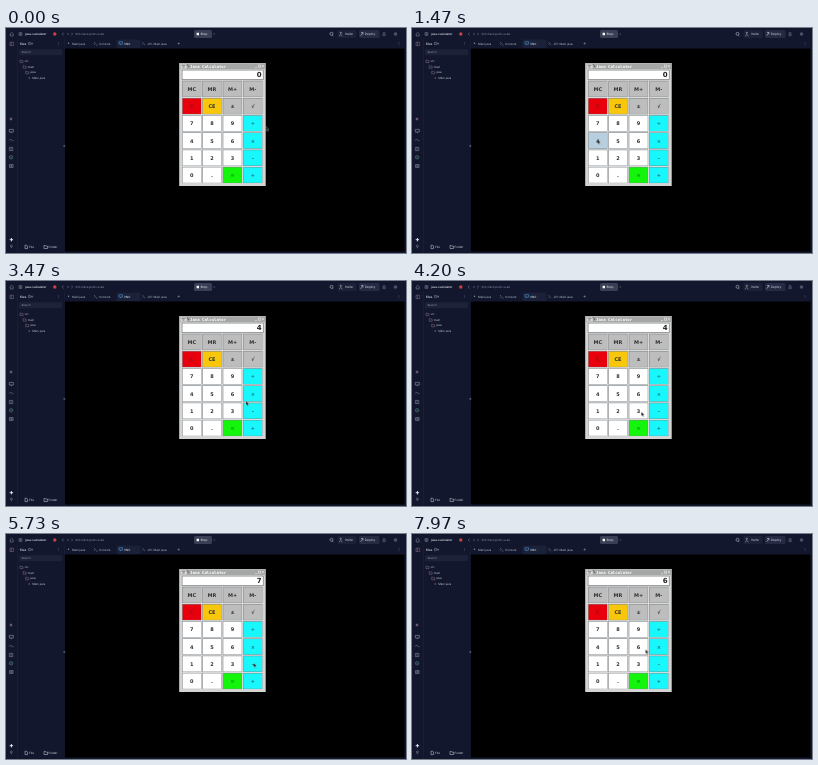
Animation of 400x225 px, one loop 8000 ms. Source, as an HTML page:

```html
<!DOCTYPE html>
<html lang="en">
<head>
<meta charset="utf-8">
<title>Java Calculator</title>
<style>
  html, body { margin: 0; width: 100%; height: 100%; overflow: hidden; background: #000; }
  svg { display: block; width: 100vw; height: 100vh; }
  text { font: 3px Inter, sans-serif; text-rendering: geometricPrecision; }
  .key, .value { font-family: "DejaVu Sans", sans-serif; font-weight: 700; text-anchor: middle; }
  .key { font-size: 5px; }
  .value { font-size: 7px; text-anchor: end; }
  .caption { font: 700 4px "DejaVu Sans Mono", monospace; }
</style>
</head>
<body>
<svg id="stage" viewBox="0 0 400 225" preserveAspectRatio="none"></svg>
<script>
const LOOP = 8000;
const stage = document.getElementById("stage");
const NAVY = "#12172d", LINE = "#1f2740", PALE = "#d5dbe5", MUTED = "#8b95a8", FOLDER = "#8d7085";

function add(tag, attrs, content) {
  const node = document.createElementNS("http://www.w3.org/2000/svg", tag);
  for (const name in attrs) node.setAttribute(name, attrs[name]);
  if (content) node.textContent = content;
  return stage.appendChild(node);
}
const rect = (x, y, width, height, fill, rx = 0) => add("rect", { x, y, width, height, fill, rx });
const dot = (cx, cy, r, fill) => add("circle", { cx, cy, r, fill });
const stroke = (d, color = MUTED, width = 0.5) =>
  add("path", { d, fill: "none", stroke: color, "stroke-width": width });
const label = (x, y, content, fill = PALE, size = 3, weight = 400) =>
  add("text", { x, y, fill, style: `font-size:${size}px;font-weight:${weight}` }, content);
const loop = (node, frames) => node.animate(frames, { duration: LOOP, iterations: Infinity });
const menuDots = (x, y) => [-1, 0, 1].forEach(step => dot(x, y + step, 0.3, MUTED));

function drawHeader() {
  stroke("M3.7 6.2l2-1.9 2 1.9M4.3 6v2h2.8v-2");
  stroke("M13 4.7h2.8v2.6H13zM14.4 4.7v2.6");
  label(19.2, 7.1, "java-calculator", PALE, 2.95, 600);
  dot(48.8, 6, 1.7, "#c8403f");
  stroke("M57.6 4.6l-1.4 1.4 1.4 1.4M61 6h2M65.4 4.8l1.2 1.2-1.2 1.2");
  label(69.5, 7.1, "5/5 checkpoints used", MUTED, 2.8);
  rect(188, 2, 18, 8, "#3a3f55", 1.5);
  rect(190.6, 4.8, 2.4, 2.4, "#f5f9fc", 0.3);
  label(194.6, 7.1, "Stop", "#f5f9fc", 3.1);
  stroke("M207.3 5.5l.9.9.9-.9");
  stroke("M326.3 7.2l1 1M327 5.8a1.5 1.5 0 1 1-3 0 1.5 1.5 0 1 1 3 0", PALE);
  rect(331.5, 2, 19, 8, "#1c2138", 1.5);
  stroke("M333.2 8q1.6-3 3.2 0M335.4 4.8a.6.6 0 1 1-1.2 0 .6.6 0 1 1 1.2 0", PALE);
  label(338.8, 7.1, "Invite", PALE, 3.15);
  rect(353, 2, 20.5, 8, "#262b43", 1.5);
  stroke("M354.6 7.8l2.3-3.2M355 4.5h2v2", PALE);
  label(358.8, 7.1, "Deploy", PALE, 3.15);
  stroke("M376.7 7.2h2.8l-.5-.8v-1q0-1-.9-1t-.9 1v1zM377.8 8h.6");
  dot(389.5, 6, 1.8, "#4c5268");
}

function drawTabs() {
  rect(110.5, 11.5, 24, 8.5, "#1b2139", 1.2);
  const tabs = [[66, "Main.java"], [93, "Console"], [118, "VNC"], [141.5, "JPI: Main.java"]];
  tabs.forEach(([x, name]) => label(x, 16.5, name, name === "VNC" ? "#f5f9fc" : "#b4bdcb", 2.95));
  dot(62.5, 15.3, 0.7, MUTED);
  stroke("M88 14l1.4 1.4L88 16.8M90 17h1.5");
  stroke("M113 13.7h3.5v2.4H113zM114.7 16v1.1", "#55a6ed");
  stroke("M136.5 14.2l1.2 1.2-1.2 1.2M138.2 16.7h1");
  stroke("M171.5 15.5h2.4M172.7 14.3v2.4");
  menuDots(393, 15.5);
}

function drawSidebar() {
  stroke("M11.5 11v214M58.3 11v214", LINE, 0.5);
  stroke("M4 14.2h3.6v3.4H4zM5.4 14.2v3.4", FOLDER);
  label(13.7, 17, "Files", PALE, 3, 600);
  stroke("M22.5 14.4h1.8v2.2h-1.8zM26 14.4v2.4M24.9 15.6h2.2");
  menuDots(52.5, 15.5);
  rect(13, 21.3, 43, 5.9, "#1d2239", 1);
  label(15.5, 25.2, "Search", MUTED, 2.8);

  [[14, 33, "src"], [17.2, 38.6, "main"], [19.7, 44.2, "java"]].forEach(([x, y, name]) => {
    stroke(`M${x} ${y - 1}h1.1l.5.6h1.4v2h-3z`, FOLDER);
    label(x + 4.5, y + 1, name, "#b4bdcb", 2.9);
  });
  dot(23.2, 50, 0.7, FOLDER);
  label(26.2, 51, "Main.java", "#b4bdcb", 2.9);

  stroke("M5 89.4v3.2M3.4 91h3.2M3.9 89.9l2.2 2.2M3.9 92.1l2.2-2.2", FOLDER);
  stroke("M3.3 101.4h4v2.6h-4zM5.3 104v1.2", "#a4afc2");
  stroke("M3.2 112.6q1-2.4 2.4-.6t2 .3");
  stroke("M3.4 119.4h3.4v3.2H3.4zM5.1 119.4v3.2");
  stroke("M6.8 129.3a1.7 1.7 0 1 1-3.4 0 1.7 1.7 0 1 1 3.4 0M4.4 129.3h1.4", "#62a38d");
  stroke("M3.5 136.5h3.6v3H3.5zM3.5 138h3.6M5.3 136.5v3");
  stroke("M5.4 210v3.4M3.7 211.7h3.4", "#f0f3f7", 0.9);
  stroke("M6.4 218a1 1 0 1 1-2 0 1 1 0 1 1 2 0M5.4 219v1.2");

  stroke("M19 217.2h1.7l.8.8v2.6H19z", PALE);
  label(23, 220, "File", PALE, 2.95);
  stroke("M38 217.5h1.3l.5.6h1.8v2.4H38z", PALE);
  label(42.6, 220, "Folder", PALE, 2.95);
  dot(58.2, 118, 1.3, "#27324a");
  stroke("M58.5 117.3l-.7.7.7.7", PALE, 0.35);
}

const COLS = [185.8, 206, 226.5, 246.9];
const ROWS = [61, 78.2, 95.4, 112.7, 129.9, 147.1];
const LABELS = ["MC MR M+ M-", "C CE ± √", "7 8 9 ÷", "4 5 6 ×", "1 2 3 -", "0 . = +"];

function keyColor(row, col, name) {
  if (name === "C") return "#e8000c";
  if (name === "CE") return "#f8c70c";
  if (name === "=") return "#14f50c";
  if (row < 2) return "#bdbdbd";
  return col === 3 ? "#18f7fb" : "#fff";
}

// Keys with a thin dark edge and a light lower-right lip; returns each face by its label.
function drawKeys() {
  const faces = {};
  LABELS.forEach((line, row) => line.split(" ").forEach((name, col) => {
    const x = COLS[col], y = ROWS[row];
    rect(x - 9.3, y - 7.8, 19.3, 16.3, "#f4f4f4");
    rect(x - 9.7, y - 8.2, 19.3, 16.3, "#7d8388");
    faces[name] = rect(x - 9.2, y - 7.7, 18.4, 15.4, keyColor(row, col, name));
    const ink = name === "C" ? "#9c1015" : name === "=" ? "#157a18" : col === 3 && row > 1 ? "#156e80" : "#303030";
    add("text", { class: "key", x, y: y + 1.8, fill: ink }, name);
  }));
  return faces;
}

function drawWindow() {
  rect(173.2, 35, 86.5, 123, "#d4d4d4");
  rect(173.5, 35.3, 85.9, 5.8, "#a5a7a6");
  rect(174.5, 36, 6.2, 4.5, "#d9d9d9");
  stroke("M175.5 37.2h4M176.4 39h2.2M180.7 36l2.3 3", "#333", 0.6);
  add("text", { class: "caption", x: 184, y: 39.5, fill: "#fff" }, "Java Calculator");
  stroke("M249 39.6h2M252.5 37h2v2.4h-2zM256 37l2 2.4m0-2.4l-2 2.4", "#f6f6f6", 0.5);
  rect(175.8, 41.8, 81.7, 10, "#6e7478");
  rect(176.4, 42.4, 80.5, 8.8, "#fff");
  return drawKeys();
}

// Key clicks: press time, key, value shown on release.
const CLICKS = [
  [1430, "4", "4"], [3740, "+", "4"], [4370, "3", "3"], [4900, "=", "7"],
  [5770, "-", "7"], [6560, "1", "1"], [7210, "=", "6"]
];
const HOLD = 110;

function playClicks(faces) {
  for (const name of new Set(CLICKS.map(click => click[1]))) {
    const face = faces[name], base = face.getAttribute("fill");
    const frames = [{ offset: 0, fill: base, easing: "step-end" }];
    CLICKS.filter(click => click[1] === name).forEach(([time]) => frames.push(
      { offset: time / LOOP, fill: "#b8cfe0", easing: "step-end" },
      { offset: (time + HOLD) / LOOP, fill: base, easing: "step-end" }));
    frames.push({ offset: 1, fill: base });
    loop(face, frames);
  }
  const shown = [[0, "0"], ...CLICKS.map(([time, , value]) => [time + HOLD, value])];
  for (const value of new Set(shown.map(step => step[1]))) {
    const node = add("text", { class: "value", x: 255.7, y: 48.9, fill: "#222" }, value);
    const frames = shown.map(([time, current]) =>
      ({ offset: time / LOOP, opacity: +(current === value), easing: "step-end" }));
    loop(node, [...frames, { offset: 1, opacity: 0 }]);
  }
}

// Pointer stops: time, x, y, easing towards the next stop.
const PATH = [
  [0, 260, 98.5, "ease-in-out"], [500, 199, 121, "ease-out"],
  [1150, 185.3, 111.5, "linear"], [2850, 186, 112, "ease-in"],
  [3470, 240, 120, "ease-out"], [3700, 247, 145, "linear"],
  [3880, 247, 145, "ease-in-out"], [4300, 227, 129, "linear"],
  [4510, 227, 129, "ease-in-out"], [4830, 226, 144, "linear"],
  [5150, 226, 144, "ease-in-out"], [5690, 247.5, 129, "linear"],
  [5900, 247.5, 129, "ease-in-out"], [6480, 187, 129, "linear"],
  [6700, 187, 129, "ease-in-out"], [7130, 226, 145, "linear"],
  [7570, 226, 145, "ease-in-out"], [7970, 233.5, 115.5, "linear"],
  [LOOP, 233.5, 115.5, "linear"]
];

function playPointer() {
  const pointer = add("path", {
    d: "M0 0v4l1-.8.7 1.5.8-.4-.7-1.4h1.3z",
    fill: "#080808", stroke: "#e8e8e8", "stroke-width": 0.3
  });
  loop(pointer, PATH.map(([time, x, y, easing]) =>
    ({ offset: time / LOOP, transform: `translate(${x}px, ${y}px)`, easing })));
}

rect(0, 0, 400, 225, NAVY);
rect(58.5, 20.5, 340, 203, "#000", 1);
drawHeader();
drawTabs();
drawSidebar();
playClicks(drawWindow());
playPointer();
</script>
</body>
</html>
```
